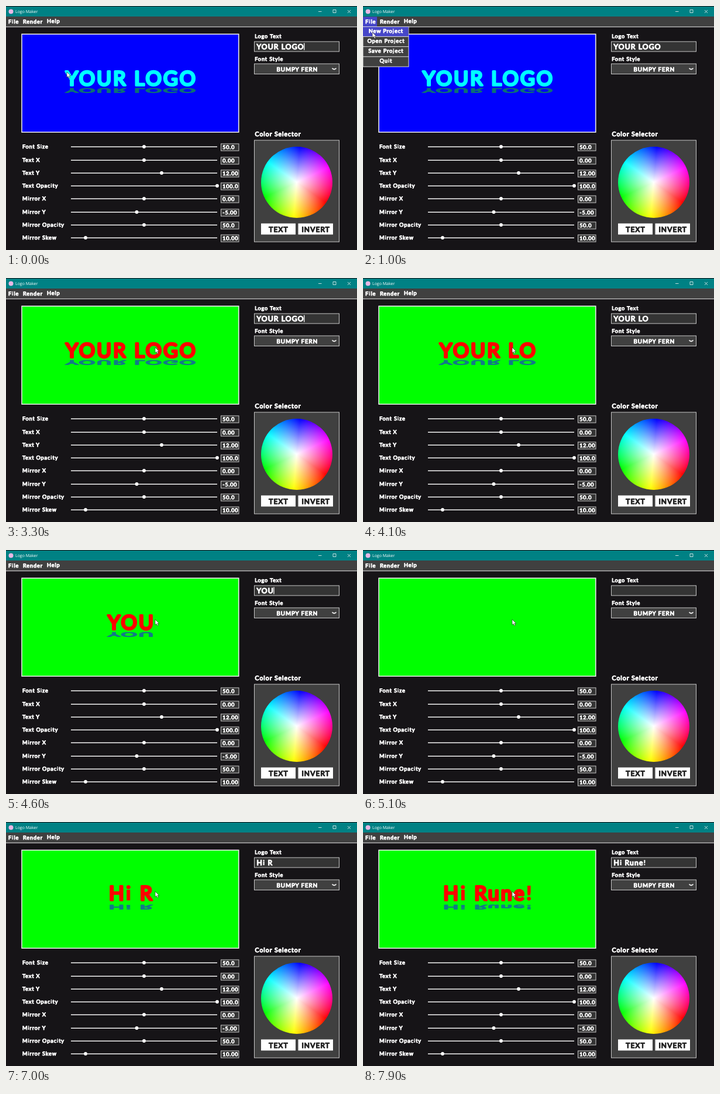
Animation, 600 px wide and 418 px high, one loop 8 s. Source, as an HTML page:

```html
<!DOCTYPE html>
<html lang="en">
<head>
<meta charset="utf-8">
<title>Logo Maker</title>
<style>
html, body { margin: 0; width: 100%; height: 100%; overflow: hidden; background: #161417; }
#stage { position: relative; width: 600px; height: 418px; overflow: hidden; }
svg { display: block; }
text {
  font-family: Lato, "Open Sans", sans-serif;
  font-weight: 400;
  letter-spacing: .093em;
  stroke-width: .11em;
  stroke-linejoin: round;
  white-space: pre;
  text-rendering: geometricPrecision;
}
/* A thinner outline keeps the gap below the dot open */
.dotted { font-weight: 900; stroke-width: .02em; }
.title { font: 400 7px "Open Sans", sans-serif; letter-spacing: 0; stroke: none; }
#wheel {
  position: absolute; left: 436px; top: 241px; width: 122px; height: 122px; border-radius: 50%;
  background:
    radial-gradient(closest-side, #fff, rgba(255,255,255,0)),
    conic-gradient(from 125deg, #f00, #ff0, #0f0, #0ff, #00f, #f0f, #f00);
}
</style>
</head>
<body>
<div id="stage">
  <svg id="art" width="600" height="418" viewBox="0 0 600 418"></svg>
  <div id="wheel"></div>
</div>
<script>
const LOOP = 8000;
const BLINK = 1040;
const art = document.getElementById('art');

function add(tag, attrs, parent = art) {
  const el = document.createElementNS('http://www.w3.org/2000/svg', tag);
  for (const key in attrs) el.setAttribute(key, attrs[key]);
  parent.appendChild(el);
  return el;
}

function box(x, y, width, height, fill, stroke = 'none', parent = art) {
  return add('rect', { x, y, width, height, fill, stroke }, parent);
}

function line(d, width = 1, parent = art) {
  return add('path', { d, fill: 'none', stroke: '#f4f4f4', 'stroke-width': width }, parent);
}

function setText(el, str) {
  el.textContent = '';
  for (const part of str.split(/([ij!])/)) {
    if (!part) continue;
    const span = add('tspan', {}, el);
    span.textContent = part;
    if (/[ij!]/.test(part)) span.setAttribute('class', 'dotted');
  }
}

function label(str, x, y, size, { anchor = 'start', color = '#fff', parent = art } = {}) {
  const el = add('text', { x, y, 'font-size': size, 'text-anchor': anchor, fill: color, stroke: color }, parent);
  setText(el, str);
  return el;
}

// Window frame and menu bar
box(0, 0, 600, 418, '#161417');
box(0, 1, 600, 17, '#008184');
add('circle', { cx: 8.5, cy: 9.5, r: 4, fill: '#e9b8e6' });
const title = add('text', { x: 16, y: 12.3, fill: '#fff', class: 'title' });
title.textContent = 'Logo Maker';
line('M534 9.500h5.500M559 6.500h5v5h-5zM584 7l5 5m0-5l-5 5', .8);
box(0, 18, 600, 17.5, '#404040');
const fileTab = box(0, 18.5, 24, 16.5, '#4646c8');
line('M0 35.800H600');
label('File', 4, 30, 9.2);
label('Render', 29, 29.8, 9.2);
label('Help', 70, 29.2, 9.2);

// Preview
const preview = box(27, 48.2, 370.8, 168, '#00f', '#f4f4f4');
preview.setAttribute('stroke-width', 1.5);
const mirror = label('', 0, 0, 33.8, { anchor: 'middle' });
const logo = label('', 214.5, 0, 33.8, { anchor: 'middle' });

// Sliders: name, knob position, value
[
  ['Font Size', .5, '50.0'],
  ['Text X', .5, '0.00'],
  ['Text Y', .62, '12.00'],
  ['Text Opacity', 1, '100.0'],
  ['Mirror X', .5, '0.00'],
  ['Mirror Y', .45, '-5.00'],
  ['Mirror Opacity', .5, '50.0'],
  ['Mirror Skew', .1, '10.00']
].forEach(([name, pos, value], i) => {
  const y = Math.round(241.2 + i * 22.3);
  label(name, 27.9, y + 3.1, 9.2);
  line(`M111 ${y + .3}H361`, 1.4);
  add('circle', { cx: 111 + 250 * pos, cy: y, r: 2.9, fill: '#fff' });
  box(367.5, y - 5, 30.5, 12, '#343434', '#c8c8c8');
  label(value, 370.3, y + 4.3, 8.9);
});

// Right column
label('Logo Text', 425.2, 55, 9.2);
box(424.5, 61, 145, 17, '#343434', '#c8c8c8');
const field = label('', 428.5, 73.6, 12.2);
const caret = box(507, 63.5, 1.3, 12, '#fff');
label('Font Style', 425.2, 94, 9.2);
box(424.5, 99, 145, 17.5, '#404040', '#c8c8c8');
label('BUMPY FERN', 497.8, 111.5, 9.8, { anchor: 'middle' });
line('M557.500 106.500q3.500 4 7 0', 1.8);
label('Color Selector', 425.5, 222.8, 10.5);
box(424.5, 230, 145, 174, '#404040', '#c8c8c8');
box(436, 372.5, 59, 19, '#fff');
box(499.5, 372.5, 59.5, 19, '#fff');
label('TEXT', 466, 387, 12, { anchor: 'middle', color: '#222' });
label('INVERT', 529.7, 387, 12, { anchor: 'middle', color: '#222' });

// File menu
const menu = add('g', {});
box(0, 35.5, 78, 68.5, '#404040', '#dcdcdc', menu);
const firstItem = box(0, 36, 77.5, 16, '#404040', 'none', menu);
['New Project', 'Open Project', 'Save Project', 'Quit'].forEach((name, i) => {
  label(name, 39.4, 45.8 + i * 17.2, 9.2, { anchor: 'middle', parent: menu });
  if (i) line(`M0 ${35.2 + i * 17.2}H78`, .9, menu);
});

const pointer = add('path', {
  d: 'M0 0V9.300L2.200 7.300 3.800 10.800 5.400 10 3.900 6.700H6.700Z',
  fill: '#fff', stroke: '#222', 'stroke-width': .6
});

// Pointer path: time, x, y
const path = [
  [0, 104, 113], [550, 13, 26], [700, 13, 26], [900, 16, 45],
  [1500, 16, 45], [2100, 255, 119], [LOOP, 255, 119]
];

function pointerAt(t) {
  const i = path.findIndex(p => p[0] > t);
  const [t0, x0, y0] = path[i - 1], [t1, x1, y1] = path[i];
  const u = (t - t0) / (t1 - t0);
  const k = u * u * (3 - 2 * u);
  return [x0 + (x1 - x0) * k, y0 + (y1 - y0) * k];
}

const FIRST = 'YOUR LOGO', SECOND = 'Hi Rune!';
const keyTimes = [6400, 6550, 6700, 6900, 7150, 7300, 7500, 7700];

function typedAt(t) {
  if (t < 3900) return FIRST;
  if (t < 6000) return FIRST.slice(0, Math.max(0, 8 - Math.floor((t - 3900) / 130)));
  return SECOND.slice(0, keyTimes.filter(k => k <= t).length);
}

function paint(el, color) {
  el.setAttribute('fill', color);
  el.setAttribute('stroke', color);
}

function show(el, on) {
  el.setAttribute('visibility', on ? 'visible' : 'hidden');
}

function draw(t) {
  const str = typedAt(t);
  const fresh = t >= 1400;
  const second = t >= 6000;
  for (const el of [logo, mirror, field]) setText(el, str);
  preview.setAttribute('fill', fresh ? '#0f0' : '#00f');
  paint(logo, fresh ? '#f00' : '#0ff');
  paint(mirror, fresh ? '#127a88' : '#0b7074');
  logo.setAttribute('y', second ? 134.3 : 135.7);
  mirror.setAttribute('transform', `translate(214.5 ${second ? 142 : 140.5}) scale(1 -.31)`);

  show(caret, t % BLINK < BLINK / 2);
  caret.setAttribute('x', 428 + (str ? field.getComputedTextLength() : 0));

  show(fileTab, t >= 500 && !fresh);
  show(menu, t >= 600 && !fresh);
  firstItem.setAttribute('fill', t >= 800 ? '#4646c8' : '#404040');
  pointer.setAttribute('transform', `translate(${pointerAt(t)})`);
}

const start = performance.now();
function tick() {
  draw((performance.now() - start) % LOOP);
  requestAnimationFrame(tick);
}
tick();
</script>
</body>
</html>
```
